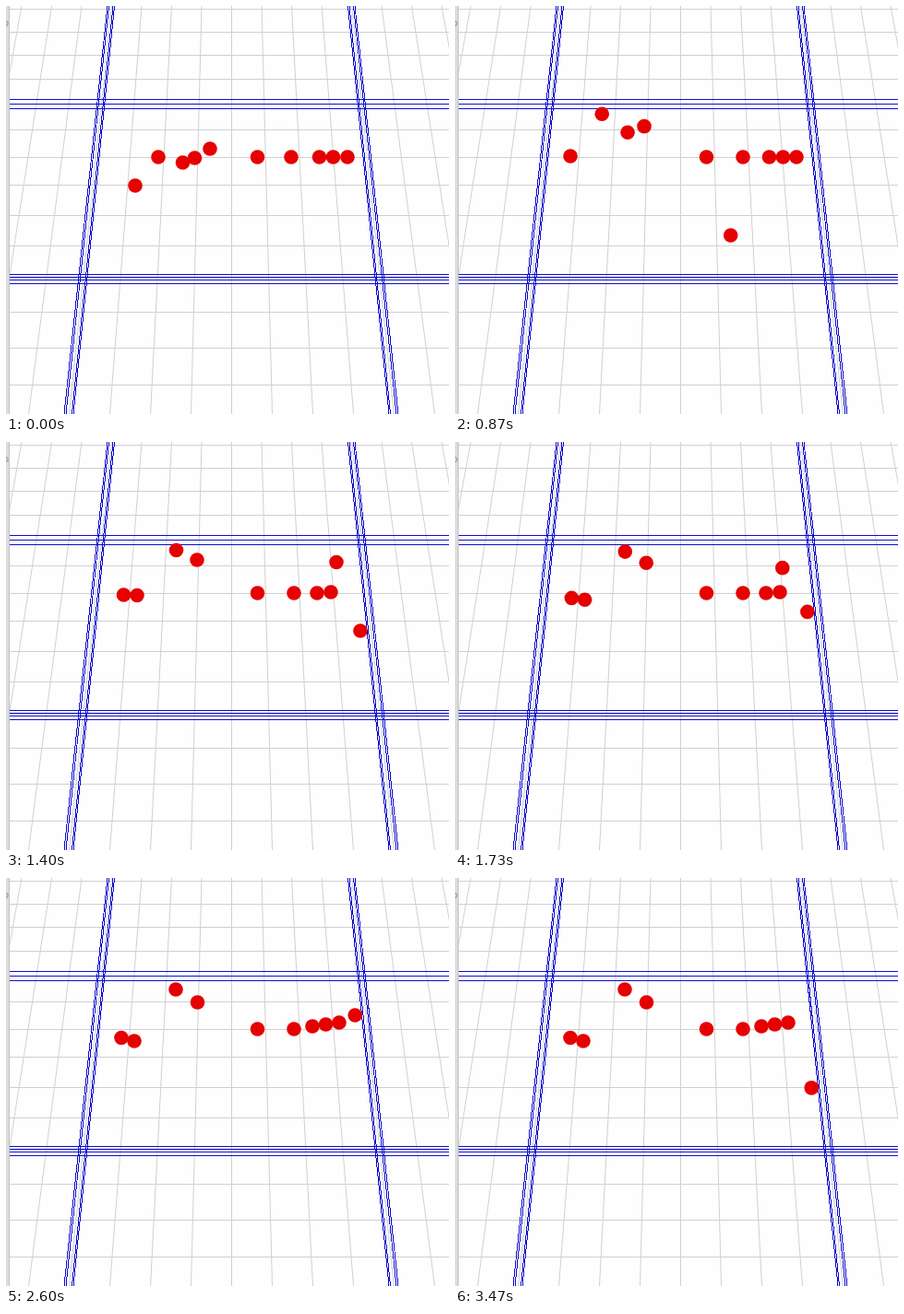
Write an HTML page that moves like this. It is 480 px wide and 443 px high and loops after 3.54 s.

```html
<!DOCTYPE html>
<html lang="en">
<head>
<meta charset="utf-8">
<title>Rolling balls</title>
<style>
  html, body { margin: 0; width: 100%; height: 100%; overflow: hidden; background: #fefefe; }
  svg { display: block; width: 480px; height: 443px; }
  .grid { stroke: #d0d0d0; }
  .wall { stroke: #0c0cd0; shape-rendering: crispEdges; }
  .balls { fill: #e60000; }
</style>
</head>
<body>
<svg viewBox="0 0 480 443">
  <g class="grid"></g>
  <g class="wall"></g>
  <rect width="3" height="443" fill="#dcdcdc"/>
  <path d="M3.5 0V443" stroke="#c4c4c4"/>
  <path d="M0 16.5L2 17.5V20.5L0 21.5" fill="none" stroke="#888"/>
  <g class="balls"></g>
</svg>
<script>
const W = 480, H = 443, MID = 244, LOOP = 3540, FPS = 15, LAST = 52;

function add(parent, tag, attrs) {
  const el = document.createElementNS("http://www.w3.org/2000/svg", tag);
  for (const k in attrs) el.setAttribute(k, attrs[k]);
  parent.append(el);
  return el;
}
const pick = s => document.querySelector(s);
const line = (g, x1, y1, x2, y2) => add(g, "line", { x1, y1, x2, y2 });

// Floor grid in perspective: rows spread out as they come closer.
const grid = pick(".grid"), wall = pick(".wall");
for (let k = -1; k <= 12; k++) {
  const y = Math.floor(1 / (1 / 1280 - k * 1.502e-5) - 1252) + 0.5;
  line(grid, 3, y, W, y);
}
for (let k = -7; k <= 7; k++) line(grid, MID + 0.5 + k * 32.5, 0, MID + 0.5 + k * 44, H);

for (const y of [101, 106, 111, 291, 294, 297, 301]) line(wall, 3, y + 0.5, W, y + 0.5);
for (const [top, bottom] of [[134, 181], [132.5, 179], [128, 172.5], [126.5, 171]])
  for (const side of [-1, 1]) line(wall, MID + side * top, 0, MID + side * bottom, H);

// Straight legs between [x, y] points at the given times; the last point holds.
function legs(times, points) {
  return t => {
    let i = 0;
    while (i < points.length - 1 && times[i + 1] <= t) i++;
    const a = points[i], b = points[i + 1] || a;
    const f = (t - times[i]) / (times[i + 1] - times[i]) || 0;
    return a.map((v, n) => v + (b[n] - v) * f);
  };
}

// The striker ends up bouncing along the right wall, slowing down.
const TOP = 117, SPAN = 168, ALONG = 1250;
function bounce(t) {
  const s = t - 1400;
  const way = 88 + s * (0.57686 - 1.0808e-4 * s + 8.9e-9 * s * s);
  const turn = (way + 2 * SPAN) % (2 * SPAN);
  const y = TOP + SPAN - Math.abs(SPAN - turn);
  return [363 + 0.102 * y, y];
}
const cross = legs([0, 400, 470, 740, 870, 1040, ALONG],
  [[165, 164], [148, 164], [177, 167], [250, 285], [300, 248], [379, 184], [375, TOP]]);

const near = [0, 400, 870, 1400, 2130], far = [0, 400, 1040, 1400, 2130, 2600];
const still = [272.5, 164], paired = [340.5, 164], third = [355.5, 164], edge = [370, 164];
const moves = [
  legs(near, [[140, 195], [129.5, 164], [125, 163], [127.5, 166], [125, 173.5]]),
  t => t < ALONG ? cross(t) : bounce(t),
  legs(near, [[191.5, 170], [191.5, 170], [187, 137], [184.5, 117.5], [184, 121]]),
  legs(near, [[204.5, 165], [194, 153.5], [159, 117], [142, 166.5], [139, 177]]),
  legs(near, [[221, 155], [208, 150], [205, 130.5], [207, 128], [207.5, 135]]),
  () => still,
  legs(near, [[309, 164], [312, 164]]),
  legs(far, [[339.5, 164], paired, paired, [337, 164], [337, 164], [332, 161]]),
  legs(far, [[354.5, 164], third, third, [352, 163], [352, 163], [346.5, 159]]),
  legs(far, [edge, edge, edge, [358, 130.5], [351, 144], [361, 157]])
];
const balls = moves.map(() => add(pick(".balls"), "circle", { r: 7.8 }));

function draw(now) {
  const step = Math.min(LAST, Math.floor(((now % LOOP) + 3.4) * FPS / 1000));
  const t = step * 1000 / FPS;
  balls.forEach((ball, i) => {
    const [x, y] = moves[i](t);
    ball.setAttribute("cx", x);
    ball.setAttribute("cy", y);
  });
}

let start;
function tick(now) {
  start ??= now;
  draw(now - start);
  requestAnimationFrame(tick);
}
draw(0);
requestAnimationFrame(tick);
</script>
</body>
</html>
```
